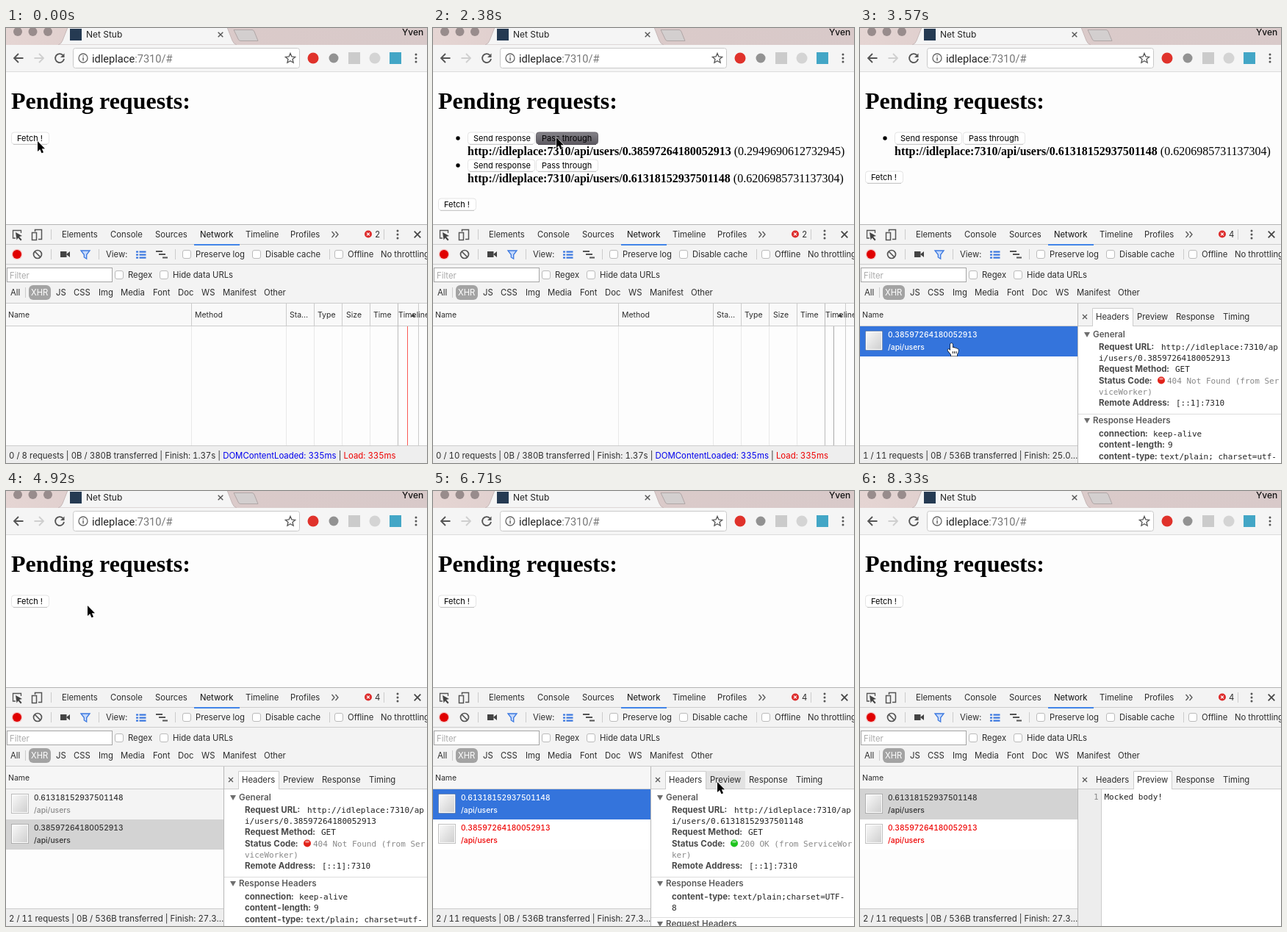
Recreate the animation shown at these times as an HTML page. Size 573x592 px, loop 8480 ms.

```html
<!DOCTYPE html>
<html lang="en">
<head>
<meta charset="utf-8">
<title>Net Stub</title>
<style>
html, body { margin: 0; width: 100%; height: 100%; overflow: hidden; background: #fdfdfd; }
svg { display: block; width: 573px; height: 592px; font-family: Inter, Roboto, sans-serif; font-variant-numeric: tabular-nums; }
.serif { font-family: "Liberation Serif", "Times New Roman", serif; }
.mono { font-family: "DejaVu Sans Mono", monospace; }
.omni { font-family: Roboto, Inter, sans-serif; }
</style>
</head>
<body>
<svg id="stage" viewBox="0 0 573 592">
  <defs>
    <linearGradient id="down" x2="0" y2="1"><stop stop-color="#858389"/><stop offset="1" stop-color="#5c5960"/></linearGradient>
    <linearGradient id="paper" x2="1" y2="1"><stop stop-color="#f8f8f8"/><stop offset="1" stop-color="#cfcfcf"/></linearGradient>
    <linearGradient id="bar" x2="1" y2="0"><stop stop-color="#e5d5d3"/><stop offset=".3" stop-color="#dccbca"/><stop offset="1" stop-color="#d8c9c9"/></linearGradient>
    <clipPath id="left"><rect y="375" width="296" height="217"/></clipPath>
  </defs>
  <g id="fixed"></g>
  <g id="live"></g>
</svg>
<script>
const LOOP = 8480, TICKS = 57;
// The picture advances in 150 ms ticks; these few last 140 ms.
const SHORT = [1, 13, 21, 38, 45, 50, 53];
const starts = [0];
for (let i = 0; i < TICKS - 1; i++) starts.push(starts[i] + (SHORT.includes(i) ? 140 : 150));

const HOST = 'idleplace:7310';
const A = { id: '0.38597264180052913', key: '0.2949690612732945' };
const B = { id: '0.61318152937501148', key: '0.6206985731137304' };
const urlOf = q => `http://${HOST}/api/users/${q.id}`;

const text = (x, y, s, size = 11.3, fill = '#2c2c2c', extra = '') =>
  `<text x="${x}" y="${y}" font-size="${size}" fill="${fill}" ${extra}>${s}</text>`;
const rect = (x, y, w, h, fill, extra = '') =>
  `<rect x="${x}" y="${y}" width="${w}" height="${h}" fill="${fill}" ${extra}/>`;
const disc = (x, y, r, fill, extra = '') =>
  `<circle cx="${x}" cy="${y}" r="${r}" fill="${fill}" ${extra}/>`;
const path = (d, stroke = '#555', w = 1.5, fill = 'none') =>
  `<path d="${d}" stroke="${stroke}" stroke-width="${w}" fill="${fill}"/>`;
const vline = (x, y, h, c = '#ccc') => rect(x, y, 1, h, c);
const hline = (x, y, w, c = '#ccc') => rect(x, y, w, 1, c);
const mono = (x, y, s, fill = '#222') => text(x, y, s, 11, fill, 'class="mono"');
const cross = (x, y, r, c, w) =>
  path(`M${x - r} ${y - r}L${x + r} ${y + r}M${x + r} ${y - r}L${x - r} ${y + r}`, c, w);
const dots = (x, y, c) => [-5, 0, 5].map(d => disc(x, y + d, 1.5, c)).join('');
const box = (x, y) => rect(x - 5.5, y - 5.5, 11, 11, '#fff', 'rx="2.5" stroke="#bbb"');
const labels = (y, list, size) => list.map(([x, s]) => text(x, y, s, size)).join('');

function browser() {
  return rect(0, 0, 573, 23, 'url(#bar)')
    + [16, 36.5, 57].map(x => disc(x, 5, 6, '#988c8c')).join('')
    + path('M71 23Q75 22 77 17L84-1H301L308 17Q310 22 314 23Z', '#c6b8b8', 1, '#f5f5f5')
    + path('M310 2.5H335Q337 2.5 338 5L343 17.5H319Q317 17.5 316 15Z', '#b0a6a6', 1, '#d3cfcf')
    + rect(0, 23, 573, 36, '#f5f5f5') + hline(0, 59, 573, '#dcdcdc')
    + rect(87, 1, 16, 16, '#253a52')
    + text(109, 13, 'Net Stub', 12, '#222')
    + cross(292, 9, 3.3, '#555', 1.4)
    + text(539, 10, 'Yven', 12, '#111', 'font-weight="500"')
    + path('M23.5 41H11M17 35L11 41L17 47', '#555', 1.8)
    + path('M38.5 41H51M45 35L51 41L45 47', '#cfcfcf', 1.8)
    + path('M77.5 37A6 6 0 1 0 79 42', '#555', 1.8)
    + path('M79.5 34.5V40H74Z', 'none', 0, '#555')
    + rect(91.5, 27.5, 308, 27, '#fff', 'rx="3" stroke="#c9c9c9"')
    + disc(105, 41, 6, 'none', 'stroke="#666" stroke-width="1.3"')
    + rect(104.3, 40, 1.5, 4.5, '#666') + rect(104.3, 37.3, 1.5, 1.5, '#666')
    + text(117, 46.5, 'idleplace<tspan fill="#777">:7310/#</tspan>', 14.6, '#222', 'class="omni"')
    + path('M387 34.5L388.9 39L393.6 39.4L390 42.5L391.1 47.2L387 44.7L382.9 47.2L384 42.5L380.4 39.4L385.1 39Z', '#555', 1.3)
    + disc(418, 41, 7.5, '#e0322b') + disc(446, 41, 6.5, '#929292')
    + rect(466, 33, 16, 16, '#cbcbcb') + disc(502, 41, 7.5, '#d4d4d4')
    + rect(522, 33, 16, 16, '#43a6c6') + dots(558, 41, '#555');
}

function tools() {
  let s = rect(0, 267, 573, 108, '#f3f3f3') + hline(0, 267, 573, '#b5b5b5')
    + [294, 321, 374].map(y => hline(0, y, 573)).join('')
    + [[61, 274], [514, 274], [61, 301], [126, 301], [230, 301], [440, 301], [26, 353]].map(([x, y]) => vline(x, y, 14)).join('')
    + rect(256, 294, 62, 2, '#4285e8');
  // tab strip
  s += path('M13 286H9.5V275.5H20.5V279', '#555', 1.3) + path('M13 278L22 283L18 284L21.5 288L20 289.5L16.5 285.5L14.5 288.5Z', 'none', 0, '#444')
    + path('M39.5 277V274.5H48.5V287.5H44M35.5 278.5H41.5V288.5H35.5Z', '#555', 1.5)
    + labels(285, [[76, 'Elements'], [142, 'Console'], [203, 'Sources'], [326, 'Timeline'], [387, 'Profiles']])
    + text(264, 285, 'Network', 11.3, '#111')
    + path('M443.5 277L447 281L443.5 285M448.5 277L452 281L448.5 285', '#555', 1.3)
    + disc(493, 280.5, 5, '#dd2c2c') + cross(493, 280.5, 1.9, '#fff', 1.3)
    + dots(533, 281, '#555') + cross(560, 281, 4.3, '#444', 1.7);
  // recording controls
  s += disc(15, 308, 7.3, '#f5c6c6') + disc(15, 308, 6, '#e00000')
    + disc(43, 308, 5.5, 'none', 'stroke="#555" stroke-width="1.7"') + path('M39 304L47 312', '#555', 1.7)
    + rect(74, 304, 8.5, 8, '#444') + path('M82 308L87 304V312Z', 'none', 0, '#444')
    + path('M102 303H114L109.7 308.5V314L106.3 312V308.5Z', '#3b78e0', 1.3, '#c5d9fb')
    + text(136, 312, 'View:')
    + [303.5, 307.5, 311.5].map(y => rect(177, y, 3, 2.2, '#3b78e0') + rect(181.5, y, 9, 2.2, '#3b78e0')).join('')
    + rect(204, 303, 9, 2, '#555') + rect(208, 307, 6, 2, '#555') + rect(211, 307, 6, 2, '#555') + rect(213, 311.5, 7, 2, '#555')
    + [246, 341, 453].map(x => box(x, 308)).join('')
    + labels(312, [[258, 'Preserve log'], [353, 'Disable cache'], [465, 'Offline'], [510, 'No throttling']]);
  // filters
  s += rect(1.5, 326.5, 143, 19, '#fff', 'stroke="#a6a6a6"') + text(5, 340.5, 'Filter', 11.3, '#aaa')
    + box(154, 336) + box(215, 336)
    + labels(340, [[166, 'Regex'], [227, 'Hide data URLs']])
    + rect(31, 350, 30, 20, '#a3a3a3', 'rx="6"') + text(34, 364, 'XHR', 11.3, '#fff')
    + labels(364, [[6, 'All'], [68, 'JS'], [92, 'CSS'], [126, 'Img'], [156, 'Media'], [200, 'Font'],
      [234, 'Doc'], [266, 'WS'], [295, 'Manifest'], [351, 'Other']]);
  return s;
}

function button(x, cy, w, label, pressed) {
  return rect(x + .5, cy - 8, w - 1, 16, pressed ? 'url(#down)' : '#fff',
    `rx="3.5" stroke="${pressed ? '#66636a' : '#e4e4e4'}"`)
    + hline(x + 3, cy + 8, w - 6, pressed ? '#4c4950' : '#c8c8c8')
    + text(x + 8, cy + 4, label, 11, '#000');
}

function page(n) {
  const items = n < 2 ? [] : n < 9 ? [A] : n < 17 ? [A, B] : n < 33 ? [B] : [];
  let s = '';
  items.forEach((q, i) => {
    const y = 150 + i * 37;
    s += disc(34, y, 2.7, '#000')
      + button(47, y, 92, 'Send response', n === 32)
      + button(140, y, 85, 'Pass through', n === 16 && q === A)
      + text(47, y + 23, `<tspan font-weight="700">${urlOf(q)}</tspan> (${q.key})`, 16, '#000', 'class="serif"');
  });
  const y = items.length ? 166 + items.length * 37 : 150;
  return s + button(7, y, 52, 'Fetch !', n === 1 || n === 8);
}

function status(n, split) {
  const done = n < 17 ? 0 : n < 33 ? 1 : 2;
  const total = n < 2 ? 8 : n < 9 ? 9 : n < 17 ? 10 : 11;
  const finish = ['1.37s', '25.0', '27.3'][done] + (split ? '…' : done ? '2s' : '');
  const tail = split ? '' : ' | <tspan fill="#00e">DOMContentLoaded: 335ms</tspan> | <tspan fill="#e00">Load: 335ms</tspan>';
  const w = split ? 296 : 573;
  return rect(0, 568, w, 24, '#eee') + hline(0, 568, w)
    + text(4, 586, `${done} / ${total} requests | 0B / ${done ? 536 : 380}B transferred | Finish: ${finish}${tail}`, 11.4);
}

function row(q, i, look) {
  const y = 406 + i * 41, bold = 'font-weight="500"';
  return rect(0, y, look.w, 41, look.bg)
    + rect(7.5, y + 6.5, 23, 26, '#fff', 'stroke="#000" stroke-opacity=".25"')
    + rect(9, y + 8, 20, 23, 'url(#paper)')
    + text(38, y + 15, q.id, 10.2, look.ink, bold) + text(38, y + 32, '/api/users', 10.3, look.sub, bold);
}

function wideTable(n) {
  const cols = [252, 381, 419, 457, 495];
  let s = rect(0, 375, 573, 30, '#f9f9f9') + hline(0, 405, 573);
  if (n >= 17) {
    s += row(A, 0, { w: 573, bg: '#f5f5f5', ink: '#e00', sub: '#e00' })
      + [[257, 'GET'], [386, '404'], [424, 'fetch'], [463, '156B'], [500, '23.5s']].map(([x, v]) => text(x, 430, v, 10.4, '#e00')).join('');
  }
  s += cols.map(x => vline(x, 375, 30) + vline(x, 406, 162, '#e8e8e8')).join('')
    + vline(533, 375, 193, '#bbb') + vline(561, 375, 193, '#ccc')
    + (n < 2 ? vline(546, 406, 162, '#fa5a55') : vline(545, 406, 162, '#aaa'))
    + labels(394, [[3, 'Name'], [257, 'Method'], [386, 'Sta…'], [424, 'Type'], [463, 'Size'], [500, 'Time'], [534, 'Timeline']], 10.5)
    + path('M551 393L554 388L557 393Z', 'none', 0, '#444');
  return s + status(n, false);
}

function rowList(n, pos) {
  const rows = n < 33 ? [A] : [B, A], sel = n < 40 ? A : B;
  const focused = n < 32 || (n >= 40 && n < 46);
  let s = rect(0, 375, 296, 30, '#f6f6f6') + hline(0, 405, 296) + text(3, 394, 'Name', 10.5);
  rows.forEach((q, i) => {
    const top = 406 + i * 41, over = pos[0] < 296 && pos[1] >= top && pos[1] < top + 41;
    const look = { w: 296, bg: i ? '#fff' : '#f4f4f4', ink: '#333', sub: '#888' };
    if (q === A) look.ink = look.sub = '#e00';
    if (over) look.bg = '#eaf1fc';
    if (q === sel) {
      look.bg = focused ? '#3474dc' : '#d3d3d3';
      look.ink = look.sub = focused ? '#fff' : '#333';
    }
    s += row(q, i, look);
  });
  return `<g clip-path="url(#left)">${s}${status(n, true)}</g>`;
}

const group = (y, name) => path(`M305 ${y - 7}H313L309 ${y}Z`, 'none', 0, '#6e6e6e')
  + text(317, y, name, 11.6, '#5a5a5a', 'font-weight="600"');
const field = (y, name, x, value, ink) => text(325, y, name + ':', 11.5, '#4a4a4a', 'font-weight="700"')
  + mono(x, y, value, ink);

function headers(q) {
  const ok = q === B, url = urlOf(q), ball = ok ? '#1fc41f' : '#e2231a';
  let s = group(421, 'General')
    + field(438, 'Request URL', 410, url.slice(0, 24)) + mono(325, 453, url.slice(24))
    + field(468, 'Request Method', 429, 'GET')
    + field(484, 'Status Code', 418, ok ? '200 OK (from ServiceWor' : '404 Not Found (from Ser', '#888')
    + disc(410, 479.5, 5, ball) + `<ellipse cx="410" cy="477.3" rx="3" ry="1.6" fill="#fff" opacity=".45"/>`
    + mono(325, 499, ok ? 'ker)' : 'viceWorker)', '#888')
    + field(514, 'Remote Address', 430, '[::1]:7310')
    + hline(297, 525, 276, '#ddd') + group(538, 'Response Headers');
  if (ok) {
    s += field(556, 'content-type', 408, 'text/plain;charset=UTF-') + mono(325, 571, '8')
      + hline(297, 580, 276, '#ddd') + group(593, 'Request Headers');
  } else {
    s += field(556, 'connection', 399, 'keep-alive') + field(571, 'content-length', 419, '9')
      + field(587, 'content-type', 408, 'text/plain; charset=utf-');
  }
  return s;
}

function details(n) {
  const preview = n >= 46, hover = n >= 45 && n < 48;
  const [x, w] = preview ? [372, 53] : [316, 56];
  let s = rect(297, 375, 276, 217, '#fff') + rect(297, 375, 276, 30, '#f3f3f3') + hline(297, 405, 276);
  if (hover && !preview) s += rect(372, 381, 53, 24, '#e2e2e2');
  s += path(`M${x + .5} 406V381.5H${x + w - .5}V406`, '#ccc', 1, hover && preview ? '#ececec' : '#fff')
    + cross(306, 393, 3, '#555', 1.2)
    + labels(397, [[321, 'Headers'], [377, 'Preview'], [430, 'Response'], [494, 'Timing']]);
  s += preview
    ? rect(297, 406, 31, 186, '#ededed') + vline(328, 406, 186, '#ccc') + mono(318, 420, '1', '#888') + mono(332.5, 420, 'Mocked body!')
    : headers(n < 40 ? A : B);
  return s + vline(296, 375, 217, '#b8b8b8');
}

function tooltip() {
  return rect(166, 459, 285, 25, '#000', 'opacity=".13" rx="2"')
    + rect(165.5, 457.5, 284, 23, '#f5f5f5', 'stroke="#c2c2c2"') + text(173, 473, urlOf(B), 10.4, '#222');
}

// pointer stops: tick, x, y
const STOPS = [[0, 43, 154], [3, 43, 154], [7, 44, 205], [10, 44, 205], [15, 168, 149], [18, 168, 149],
  [23, 125, 427], [24, 125, 429], [31, 111, 156], [33, 111, 156], [36, 21, 430], [37, 92, 490],
  [38, 155, 439], [40, 155, 439], [45, 387, 396], [46, 387, 396], [49, 364, 424], [55, 509, 587], [56, 509, 640]];

function pointerAt(n) {
  const i = Math.max(1, STOPS.findIndex(k => k[0] >= n));
  const a = STOPS[i - 1], b = STOPS[i];
  const u = (n - a[0]) / (b[0] - a[0]), e = (1 - Math.cos(Math.PI * u)) / 2;
  return [a[1] + (b[1] - a[1]) * e, a[2] + (b[2] - a[2]) * e].map(Math.round);
}

function pointer(n, [x, y]) {
  const hand = n >= 17 && x < 296 && y > 406 && y < 488;
  const shape = hand
    ? path('M-2 1.5Q-2 0 -.5 0Q1 0 1 1.5V6Q3.3 5 4 6.8Q6 6 6.6 7.6Q9 7.2 9 9.5Q9 13 7 15V17.5H-1V15.5L-5.5 10Q-6 8 -4 8L-2 10Z', '#000', 1.2, '#fff')
      + path('M1.2 11V14M3.6 11V14M6 11V14', '#000', .9)
    : path('M0 0V14L3.2 11L5.5 16.3L8 15.2L5.8 10.2H10Z', '#fff', 1.2, '#000');
  return `<g transform="translate(${x} ${y})" paint-order="stroke" stroke-linejoin="round">${shape}</g>`;
}

function scene(n) {
  const pos = pointerAt(n);
  return page(n)
    + text(502, 285, n < 17 ? '2' : '4')
    + (n < 23 ? wideTable(n) : rowList(n, pos) + details(n))
    + (n === 38 || n === 39 ? tooltip() : '')
    + pointer(n, pos);
}

document.getElementById('fixed').innerHTML = rect(0, 0, 573, 592, '#fdfdfd') + browser()
  + text(7, 110, 'Pending requests:', 32, '#000', 'class="serif" font-weight="700"') + tools();

const live = document.getElementById('live'), begin = performance.now();
let shown = -1;
function draw() {
  const t = (performance.now() - begin) % LOOP;
  let n = TICKS - 1;
  while (starts[n] > t) n--;
  if (n !== shown) live.innerHTML = scene(shown = n);
  requestAnimationFrame(draw);
}
draw();
</script>
</body>
</html>
```
